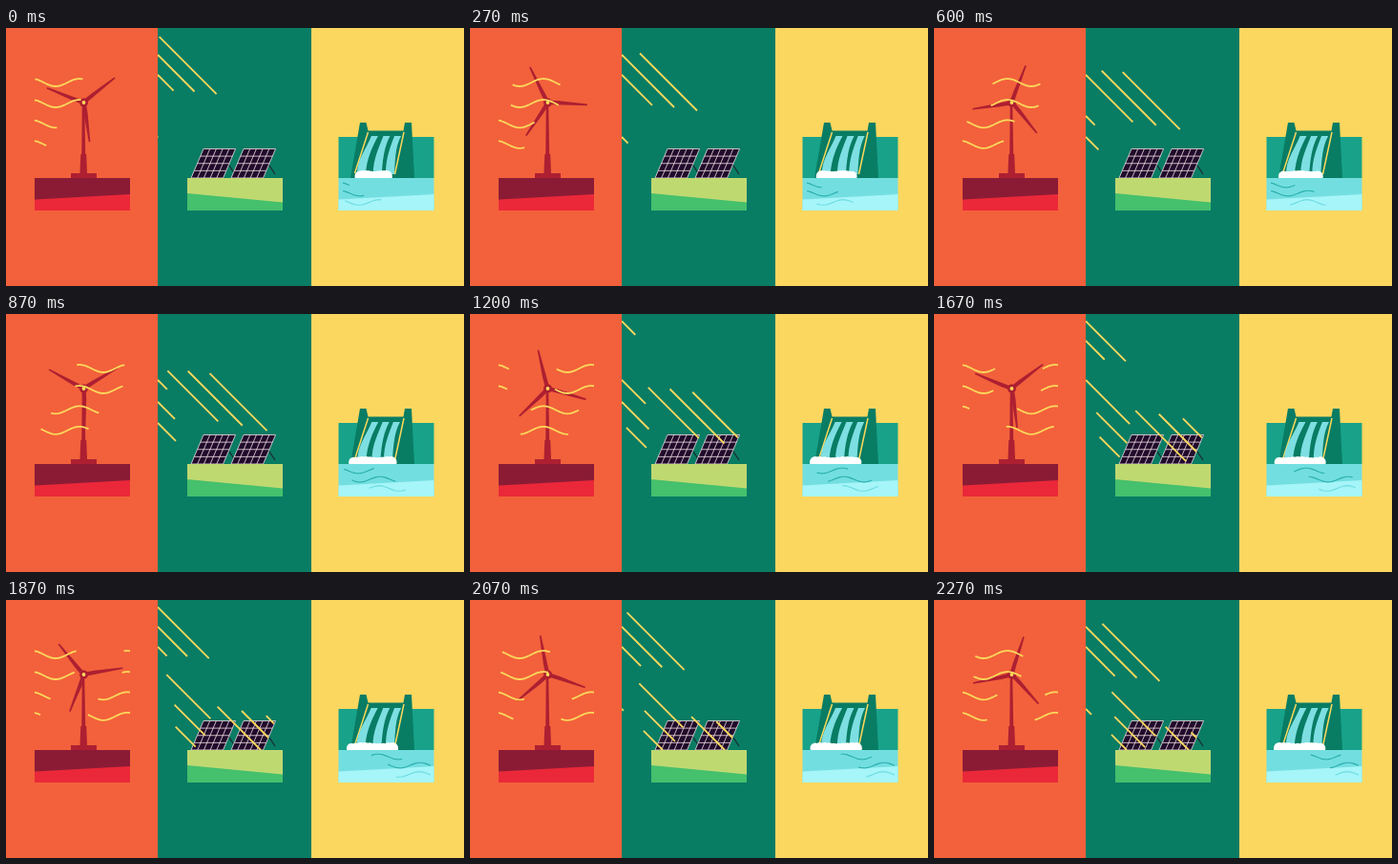
Recreate the animation shown at these times as an HTML page. Size 480 by 270 pixels, loop 2.34 s.

```html
<!DOCTYPE html>
<html lang="en">
<head>
<meta charset="utf-8">
<title>Renewable energy</title>
<style>
  html, body { margin: 0; width: 100%; height: 100%; overflow: hidden; }
  svg { display: block; width: 100vw; height: 100vh; }
  .line { fill: none; stroke: #fbd95c; stroke-width: 1.8; }
  .ripple { fill: none; stroke: #2bb0ae; stroke-width: 1.2; }
  .pale { stroke: #6fdde2; }
</style>
</head>
<body>
<svg viewBox="0 0 480 270">
  <defs>
    <path id="blade" d="M0-2.2 L12-2.4 L41.5-.8 V.8 L0 2Z"/>
    <g id="solar">
      <path d="M232 141L240 153" stroke="#1c2a33" stroke-width="1.3"/>
      <path d="M207 126.500H240.500L227.500 157H194Z" fill="#210b2c"/>
      <path id="cells" fill="none" stroke="#f3dfe4" stroke-width=".8"/>
    </g>
    <clipPath id="sky"><path d="M159 0H320V126H282L270 157H159Z"/></clipPath>
    <clipPath id="spill"><path d="M380 113H416L406 157H358Z"/></clipPath>
    <clipPath id="surface"><path d="M340 100H460V157H340Z"/></clipPath>
  </defs>

  <path fill="#f2613b" d="M0 0H160V270H0Z"/>
  <path fill="#097c64" d="M159 0H320V270H159Z"/>
  <path fill="#fcd75f" d="M320 0H480V270H320Z"/>

  <!-- wind -->
  <path fill="#8b1b35" d="M30 157H130V191H30Z"/>
  <path fill="#eb2839" d="M30 179.500L130 174V191H30Z"/>
  <g fill="#ad1f31">
    <path d="M79.800 78H82.200L83.200 132H84.200L85 152H95V157H68V152H77.500L78.300 132H79.300Z"/>
    <g id="rotor">
      <use href="#blade"/>
      <use href="#blade" transform="rotate(120)"/>
      <use href="#blade" transform="rotate(240)"/>
    </g>
    <circle cx="81.500" cy="78" r="4.500"/>
  </g>
  <g id="wind"></g>
  <circle cx="81.500" cy="78" r="1.900" fill="#fbd95c"/>

  <!-- sun -->
  <use href="#solar"/>
  <use href="#solar" x="42"/>
  <path fill="#bfd971" d="M190 157H290V191H190Z"/>
  <path fill="#45c06d" d="M190 173L290 182.500V191H190Z"/>
  <g id="rays" clip-path="url(#sky)"></g>

  <!-- water -->
  <path fill="#18a28a" d="M348.500 114H448.500V157H348.500Z"/>
  <path fill="#097c64" d="M371 99H377.500L379.500 107.500H416.500L418 99H425L428 157H361Z"/>
  <path fill="none" stroke="#fbd95c" stroke-width="1.500" d="M379.500 109L365.500 152M417 109L407.500 153"/>
  <g id="falls" fill="#7edfe2" clip-path="url(#spill)"></g>
  <g id="foam" fill="#fff" clip-path="url(#surface)"></g>
  <path fill="#73dee0" d="M348.500 157H448.500V191H348.500Z"/>
  <path fill="#a6f5f8" d="M348.500 179.500L448.500 174V191H348.500Z"/>
  <g id="ripples"></g>
</svg>
<script>
const LOOP = 2340, FPS = 15, CYCLE = 30.4;
const $ = id => document.getElementById(id);

function add(parent, tag, attrs) {
  const el = document.createElementNS('http://www.w3.org/2000/svg', tag);
  for (const k in attrs) el.setAttribute(k, attrs[k]);
  return $(parent).appendChild(el);
}

// A dash moving along x, followed by a second one a period behind.
const dashes = [];
function dash(parent, cls, d, x0, x1, end, speed, period, len) {
  const el = add(parent, 'path', {
    class: cls, d, pathLength: x1 - x0,
    'stroke-dasharray': [len, period - len, len, 999].join(' ')
  });
  dashes.push(u => el.setAttribute('stroke-dashoffset', x0 - (end + speed * u - len - period)));
}

function wave(x0, x1, mid, amp, peak, length) {
  const pts = [];
  for (let x = x0; x <= x1; x += 2)
    pts.push(x + ' ' + (mid - amp * Math.cos((x - peak) / length * 2 * Math.PI)).toFixed(2));
  return 'M' + pts.join('L');
}

// mid height, leading end
[[57, 81.8], [79, 80], [100.3, 54.8], [121.8, 43.8]].forEach(([y, end]) =>
  dash('wind', 'line', wave(30, 130, y, 4, 77, 50), 30, 130, end, 100 / CYCLE, 100, 50));

// y - x, period, leading end, last x
[[-151.5, 120, 222.2, 282], [-131, 114, 199, 277], [-110, 106, 177, 267],
 [-90, 92, 129.5, 234], [-67, 64, 149.6, 224], [-45, 42, 160, 202]].forEach(([c, p, end, x1]) =>
  dash('rays', 'line', `M159 ${159 + c}L${x1} ${x1 + c}`, 159, x1, end, p / CYCLE, p, p / 2));

// style, mid height, first peak, leading end, speed, length
[['ripple', 164, 348, 361, 1.93, 32], ['ripple', 173, 350, 376, 2.5, 46],
 ['ripple pale', 182.5, 391, 394, 1.9, 38]].forEach(([cls, y, peak, end, v, len]) =>
  dash('ripples', cls, wave(353, 445, y, 2.8, peak, 42), 353, 445, end, v, 200, len));

// grid of one slanted panel
let cells = '';
for (let i = 0; i <= 5; i++) cells += `M${207 + i * 6.7} 126.5l-13 30.5`;
for (let j = 0; j <= 4; j++) cells += `M${207 - j * 3.25} ${126.5 + j * 7.62}h33.5`;
$('cells').setAttribute('d', cells);

const falls = [[383, 368], [395, 384], [406.5, 397]].map(([top, foot], i) => {
  const el = add('falls', 'path', {});
  return u => {
    const s = Math.sin(u / CYCLE * 2 * Math.PI + i);
    const a = foot + s, b = top + s * .6;
    el.setAttribute('d', `M${b} 113H${b + 7}C${b + 1} 124 ${a + 10} 137 ${a + 9} 153H${a}C${a} 137 ${b - 5} 126 ${b} 113Z`);
  };
});

const puffs = Array.from({ length: 10 }, (_, i) => {
  const el = add('foam', 'circle', { cy: 155 });
  return u => {
    const grow = Math.min(1, (u + .4) / 18);
    const left = 371 - 9 * grow, right = 399 + 6 * grow;
    el.setAttribute('cx', left + (right - left) * i / 9);
    el.setAttribute('r', 5.6 + .5 * Math.sin(u * .4 + i));
  };
});

function draw(now) {
  const step = Math.min(34, Math.floor((now % LOOP + 4) * FPS / 1000));
  const u = step || -.4;
  $('rotor').setAttribute('transform', `translate(81.5 78) rotate(${9.474 * u - 34.6})`);
  for (const move of [...dashes, ...falls, ...puffs]) move(u);
}

const start = performance.now();
function tick() {
  draw(performance.now() - start);
  requestAnimationFrame(tick);
}
tick();
</script>
</body>
</html>
```
